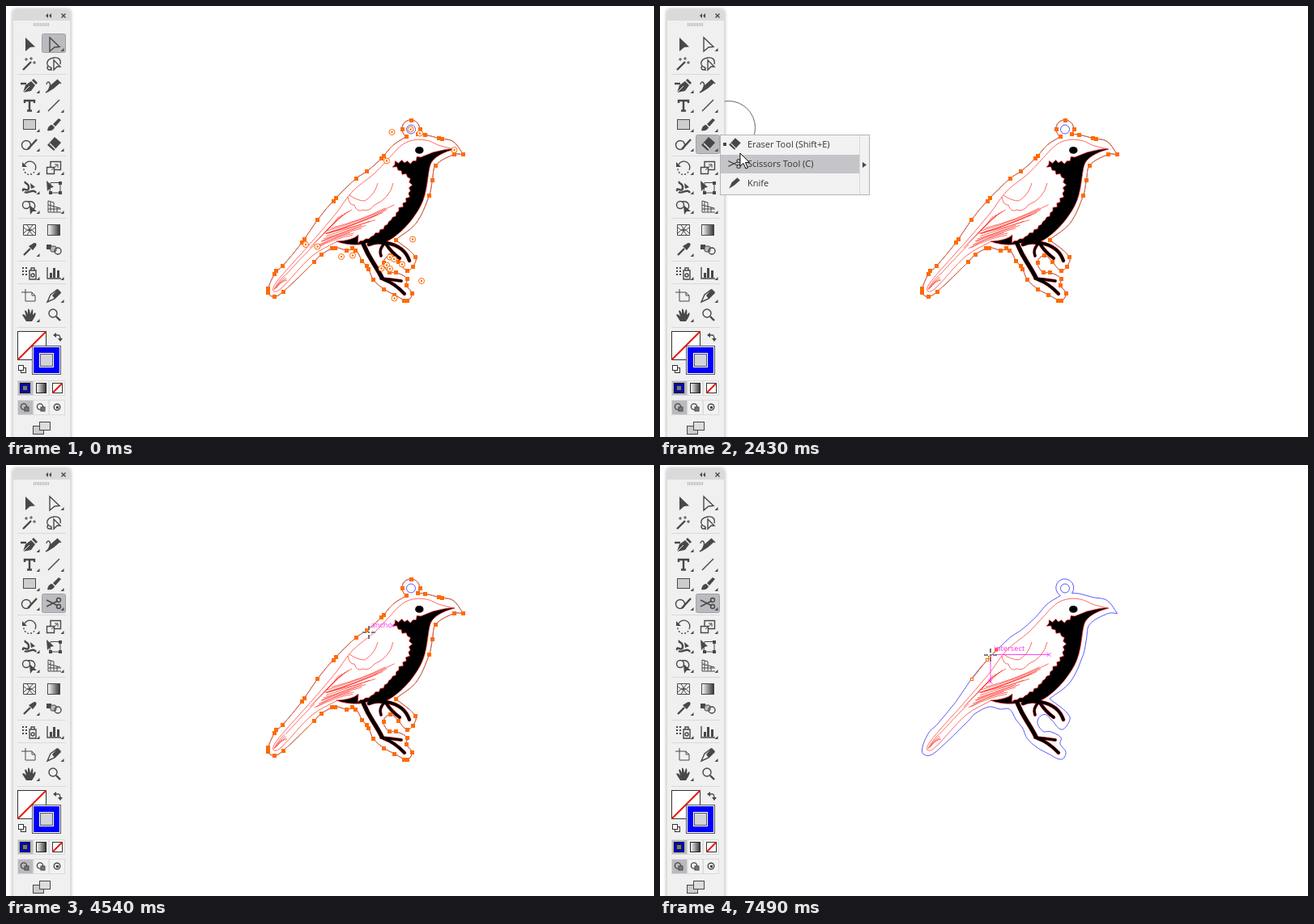
Animation of 800 by 533 pixels, one loop 8 s. Source, as an HTML page:

```html
<!DOCTYPE html>
<html lang="en">
<head>
<meta charset="utf-8">
<title>Scissors tool</title>
<style>
html, body { margin: 0; width: 100%; height: 100%; overflow: hidden; background: #fff; }
svg { display: block; width: 800px; height: 533px; }
.s { fill: none; stroke: #484848; stroke-width: 1.4; }
.thin { stroke-width: 1; }
.bold { stroke-width: 2.4; }
.f { fill: #484848; }
.sep { stroke: #d9d9d9; }
.hair { fill: none; stroke: #ff3a30; stroke-width: .75; }
.ink { fill: #000; stroke: #f22; stroke-width: .7; }
.limb { fill: none; stroke-linecap: round; }
.cut { fill: none; stroke: #3030f4; stroke-width: .8; }
.sel { fill: none; stroke: #ff6a00; stroke-width: .9; }
.node { fill: #ff6a00; }
.open { fill: #fff; stroke: #ff6a00; }
.hot .edge { stroke: #ff6a00; }
.guide { fill: none; stroke: #ff2df5; stroke-width: .9; }
.tag { font: 9.3px "Open Sans", "Noto Sans", sans-serif; fill: #ff2df5; }
.menu { font: 11px "Open Sans", "Noto Sans", sans-serif; fill: #333; }
</style>
</head>
<body>
<svg id="stage" viewBox="0 0 800 533" xmlns="http://www.w3.org/2000/svg"></svg>
<script>
const stroke = (d, cls = '') => `<path class="s ${cls}" d="${d}"/>`;
const fill = d => `<path class="f" d="${d}"/>`;
const at = (x, y, art) => `<g transform="translate(${x} ${y})">${art}</g>`;
const rect = (x, y, w, h, paint, line = 'none', extra = '') =>
  `<rect x="${x}" y="${y}" width="${w}" height="${h}" fill="${paint}" stroke="${line}" ${extra}/>`;
const ring = (x, y, r, cls = 's') => `<circle cx="${x}" cy="${y}" r="${r}" class="${cls}"/>`;
const range = n => [...Array(n).keys()];
const mix = (a, b, k) => a + (b - a) * k;

let seed = 7;
const rnd = () => (seed = seed * 16807 % 2147483647) / 2147483647;

// Smooth line through "x,y" points. "/" makes the point before it a corner,
// "*" marks a point without an anchor, "=" adds a second anchor just after.
function spline(text) {
  const nodes = [];
  let d = '', last;
  for (const run of text.trim().split('/')) {
    const p = run.trim().split(/\s+/).map(w => ({ at: w.split(',').map(parseFloat), flag: w.slice(-1) }));
    if (last) p.unshift(last);
    const dir = i => {
      const a = p[Math.max(i - 1, 0)].at, b = p[Math.min(i + 1, p.length - 1)].at;
      const n = Math.hypot(b[0] - a[0], b[1] - a[1]);
      return [(b[0] - a[0]) / n, (b[1] - a[1]) / n];
    };
    if (!last) d = 'M' + p[0].at;
    p.forEach(({ at: [x, y], flag }, i) => {
      const u = dir(i);
      if (flag !== '*') nodes.push([x, y]);
      if (flag === '=') nodes.push([x + u[0] * 4.5, y + u[1] * 4.5]);
      if (i + 1 === p.length) return;
      const [x2, y2] = p[i + 1].at, v = dir(i + 1), k = Math.hypot(x2 - x, y2 - y) / 3;
      d += `C${[x + u[0] * k, y + u[1] * k, x2 - v[0] * k, y2 - v[1] * k, x2, y2].map(n => n.toFixed(1))}`;
    });
    last = p[p.length - 1];
  }
  return { d, nodes };
}

// Ragged feather edge along a path, calmer towards its end
function ragged(d, step, size) {
  const path = document.createElementNS('http://www.w3.org/2000/svg', 'path');
  path.setAttribute('d', d);
  const length = path.getTotalLength(), n = Math.round(length / step);
  return range(n + 1).map(i => {
    const s = i * length / n;
    const a = path.getPointAtLength(s - 1), b = path.getPointAtLength(s + 1), p = path.getPointAtLength(s);
    const off = (i % 2 ? 1 : -1) * size * rnd() * (1 - .6 * i / n);
    const w = Math.hypot(b.x - a.x, b.y - a.y) || 1;
    return `L${(p.x - (b.y - a.y) / w * off).toFixed(1)},${(p.y + (b.x - a.x) / w * off).toFixed(1)}`;
  }).join('');
}

/* ---------- bird ---------- */
const outline = spline(`508.5,158.5 517,159 534,163.5= 552,167.5* 564.5,183.5 /
  553.5,183.5 530.5,197 526.5,215 522.5,234.5 506,269* 481,289 /
  505.5,310.5 502.5,322 495,327 484,316 474.5,308.5 466,317 473,329.5 481,329.5 495,337 494,345
  501,355.5 495.5,364= 479.5,357 466.5,350 453.5,338.5 447.5,325= 439.5,315 431.5,302= 420,302
  406.5,299= 389,307.5 380.5,316.5 342.5,353 331,359.5 323.5,354= 331.5,331.5= 341.5,321.5
  365.5,292.5= 384.5,264.5 404,241= 432.5,213 445.5,204.5 463.5,188.5= 478,172* 494.5,161.5`);
const whole = outline.d + 'A11,11 0 1 1 508.5,158.5';
const anchors = [...outline.nodes, ...[2, 3, 4].map(q =>
  [500 + 11 * Math.cos(q * Math.PI / 2), 152.5 + 11 * Math.sin(q * Math.PI / 2)])];

const body = spline(`553,177 535,172.5 521,166.5 505,165.5 490,171 472,189 455,207 428,229 407,257
  372,298 345,328 331,346 331,353 340,349 378,309 409,291`).d;

const chest = spline('512,187 500,193 482,192 / 478,197 488,205 498,215 498,232 486,251 470,270 452,285 434,292').d;
const bib = 'M554,177C545,176 537,179 527,181' + ragged(chest, 3.6, 3.2) +
  'L435,283Q428,290 408,291Q420,296 437,295C447,291 455,295 466,293' +
  'C480,288 500,270 512,247C521,230 520,208 524,196C527,188 538,181 554,177Z';

const limbs = [
  [5, 'M441,294Q446,306 453,317T464,336'], [3.2, 'M463,337Q474,338 488,340'],
  [3.6, 'M466,338Q480,343 492,356'], [4, 'M448,295Q458,290 470,294'],
  [3, 'M467,294Q460,301 463,309'], [3.6, 'M469,294Q476,305 486,312'], [3.8, 'M470,293Q492,297 498,315']
];
const limb = grow => limbs.map(([w, d]) =>
  `<path class="limb" d="${d}" stroke="${grow ? '#f22' : '#000'}" stroke-width="${w + grow}"/>`).join('');

// Flight feathers fan out from the wing tip, tail barbs run along the tail
const flight = range(13).map(i => {
  const k = i / 12, r = rnd() * 14;
  const x = mix(394, 378, k) + r, y = mix(279, 303, k) - r * .7;
  const x2 = mix(484, 430, k) - rnd() * 12, y2 = mix(244, 283, k) + rnd() * 5;
  return `M${x},${y}Q${mix(x, x2, .55)},${mix(y, y2, .55) - mix(-5, 4, k)} ${x2},${y2}`;
}).join('');
const coverts = range(5).map(i => `M${427 - i * 4},${252 + i * 2}Q${413 - i * 3},${258 + i * 4} ${391 - i * 4},${283 + i * 4}`).join('');
const barbs = range(4).map(i => `M${331 + i},${351 - i}Q${334 + i * 2},${343 - i} ${344 + i},${333 + i * 2}`).join('');
const scallops = 'M422,236Q424,247 430,246Q433,256 441,252Q448,255 455,246Q474,238 478,219' +
  'M424,234Q434,241 443,241Q455,234 459,219M381,295Q361,315 345,333';

const square = ([x, y]) => rect(Math.round(x - 2.5), Math.round(y - 2.5), 5, 5, '#ff6a00');
const hollow = ([x, y]) => rect(x - 1.5, y - 1.5, 3, 3, '#fff', '#ff6a00');
const dot = ([x, y]) => ring(x, y, 2.4, 'node');
const target = ([x, y]) => ring(x, y, 3.5, 'open') + ring(x, y, 1.2, 'node');
const each = (text, draw) => spline(text).nodes.map(draw).join('');

const widgets = `476.5,156 499.5,152.5 511,157.5 470,191.5 553.5,178 502,288.5 370,295 384.5,297.5 414,310
  428,308.5 474,310.5 479,313 489,319.5 470,320.5 463.5,324.5 474,325 513,340 479.5,361.5`;
const ends = '407,238 404,241 385,265';
const longCut = `<path class="sel" d="${spline('453.5,199.5 445.5,204.5 433,213 ' + ends).d}"/>` +
  each('453.5,199.5 446,204.5 441.5,207.5 437.5,209.5', dot) + each('433,213 ' + ends, hollow);
const shortCut = `<path class="sel" d="${spline('415,228.5 ' + ends).d}"/>` + dot([415.5, 228.5]) + each(ends, hollow);

const bird = `<path class="cut" d="${whole}"/>${ring(500, 152.5, 5.5, 'cut')}
  <g id="inner"><path class="hair edge" d="${body}"/><path class="hair" d="${flight}${coverts}${barbs}${scallops}"/>
  ${limb(.8)}<path class="ink edge" d="${bib}"/>${limb(0)}</g>
  <ellipse cx="510.3" cy="178.4" rx="5.2" ry="4.4"/>`;

/* ---------- panel ---------- */
const nib = fill('M-8,8L-5,-1L2,-6L7,-1L2,6Z') + fill('M3,-7L5,-9L10,-4L8,-2Z') +
  '<path d="M-8,8L0,0" stroke="#f0f0f0"/>';
const eraser = fill('M-8,1L1,-9L9,-2L0,8Z') + '<path d="M-5,-1L2,6" stroke="#eee" stroke-width="1.4"/>';
const scissors = stroke('M5,-3L-9,4M5,3L-9,-4') + ring(6, -4, 2.5) + ring(6, 4, 2.5);
const knife = fill('M-8,8L-4,-1L4,-8L8,-4L0,3Z');
const arrow = 'M-5,-8L7,3.5L1,4L-5,9Z';
const spark = (x, y) => stroke(`M${x - 2},${y}h4M${x},${y - 2}v4`, 'thin');

// Two icons per row, from top to bottom
const icons = [
  fill(arrow), stroke(arrow),
  stroke('M-8,8L2,-2', 'bold') + spark(-4, -5) + spark(2, -6) + spark(6, -1),
  stroke('M-3,5C-10,4 -11,-5 0,-7C7,-8 9,-4 8,1M-6,3a2.5,2.5 0 1 0 3,2v4') + stroke('M0,-4L8,4L4,4L0,8Z'),
  nib + stroke('M-11,-3h7', 'bold'),
  knife + stroke('M4,-8L9,-3M-9,-2C-8,-8 -3,-4 -5,1C-6,5 -8,7 -10,8'),
  stroke('M-6,-3V-6H6V-3M0,-6V6.500M-3,6.5H3', 'bold'), stroke('M-7,7L7,-7'),
  rect(-7.5, -6.5, 15, 12, '#cdcdcd', '#484848'),
  fill('M-8,7C-7,2 -5,0 -2,0L1,3C0,6 -3,8 -8,7ZM-1,-1L6,-8L9,-6L2,2Z'),
  ring(-4, 1, 5.5) + stroke('M-2,6L9,-6', 'bold'), '',
  stroke('M-6,-4A7,7 0 0 1 7,3') + '<path class="s" d="M6,5A7,7 0 0 1 -7,1" stroke-dasharray="2 2"/>' + fill('M-9,-7v6h6Z'),
  stroke('M-8.5,-.5h9v8h-9ZM-4,-1V-7.5H8.5V2.500H1') + stroke('M-3,3L5,-4M1,-4H5V0', 'thin'),
  stroke('M-8,5C-9,-2 -2,8 -1,1C0,-5 -7,-4 -5,-7M-6,6C-2,9 5,1 8,7', 'bold') + fill('M1,-5L7,0L2,2Z'),
  stroke('M-4,-5.5H8V7H-5Z', 'thin') + fill('M-9,-8L0,0L-4,1L-8,5ZM6,-7h4v4h-4ZM6,5h4v4h-4ZM-6,5h4v4h-4Z'),
  ring(-4, -2, 4.5) + stroke('M-2,-6C8,-8 9,3 3,4') + fill('M0,-2L9,6L4,6L1,10Z'),
  stroke('M-7,-7V7H9M-7,-7L0,-5V7M-7,-2L8,2M-7,3H9M-4,-6V6M4,1V7', 'thin'),
  stroke('M-7.5,-6.5H7.5V6.5H-7.5ZM-7,-3Q0,4 7,-3M-7,4Q0,-5 7,4M-3,-6Q3,0 -3,6M4,-6Q-3,0 4,6', 'thin'),
  rect(-7.5, -6.5, 15, 13, 'url(#ramp)', '#484848'),
  stroke('M-7,7L1,-1', 'bold') + fill('M-1,-4L4,1L8,-4C10,-8 6,-9 4,-7Z'),
  rect(-9, -6, 6, 6, '#484848') + rect(-4, -4, 7, 7, '#bbb', '#484848', 'rx="2"') + ring(5, 2, 4),
  stroke('M0,-3H8V8H0ZM2,-3V-6H6V-3') + ring(4, 3, 2) +
    range(6).map(i => rect(-9 + i % 2 * 4, -7 + (i >> 1) * 4, 2, 2, '#484848')).join(''),
  stroke('M-8,-7V7H9') + fill('M-5,0h3v6h-3ZM-1,-6h3v12h-3ZM4,-3h3v9h-3Z'),
  stroke('M-10,-4H3L7,0V7H-5V-8M3,-4V0H7', 'thin'),
  stroke('M-8,8L-4,-1L4,-7L8,-3L1,4Z') + fill('M-2,0L5,-8L9,-4L1,4Z'),
  fill('M-4,8L-9,0Q-7,-2 -4,2L-6,-5Q-4,-7 -2,-1V-7Q0,-9 1,-1L3,-7Q5,-7 4,0L7,-3Q9,-2 5,5L3,8Z'),
  ring(-1, -2, 5) + stroke('M3,2L8,7', 'bold')
];
const hasMore = '0100101111111110110010110110';
const groups = [[47, 2], [99, 4], [200, 3], [277, 2], [330, 1], [358, 2]];
const rows = groups.flatMap(([y, n]) => range(n).map(k => y + 24 * k));
const tool = (art, i) => at(29 + i % 2 * 30, rows[i >> 1], art + (+hasMore[i] ? fill('M12.5,5v4h-4Z') : ''));

const none = (x, y, s) => rect(x, y, s, s, '#fff', '#333') + `<path d="M${x},${y + s}L${x + s},${y}" stroke="#e21b0c" stroke-width="2"/>`;
const trio = y => range(3).map(i => rect(14.5 + i * 19.5, y, 19, 18, i ? '#f2f2f2' : '#b9b9be', '#dadada')).join('');
const mode = x => ring(x - 1, 495.5, 3.6) + rect(x, 496, 5, 5, '#777', '#484848');

const panel = `<g style="filter:drop-shadow(0 0 2px #999)"><rect x="8.5" y="4.5" width="71" height="540" rx="3" fill="#f0f0f0"/></g>
  <path d="M9,17V8Q9,5 12,5H76Q79,5 79,8V17Z" fill="#dadada"/><path class="sep" d="M9,17.5H79"/>
  ${fill('M52,9v6l-3,-3ZM56,9v6l-3,-3Z')}${stroke('M68.500,9.500l5,5m0,-5l-5,5')}
  <path d="M34,23H54" stroke="#b5b5b5" stroke-width="4" stroke-dasharray="1 1"/>
  ${groups.slice(1).map(([y]) => `<path class="sep" d="M14,${y - 14.5}H74"/>`).join('')}<path class="sep" d="M14,397.5H74"/>
  <rect id="pick" x="44.5" width="29" height="23" rx="2" fill="#bababf" stroke="#a2a2a6"/>
  ${icons.map(tool).join('')}
  <g id="eraser">${at(59, 171, eraser)}</g><g id="scissors">${at(59, 171, scissors)}</g>
  ${none(14.5, 402.5, 35)}
  ${rect(32.5, 420.5, 35, 35, '#fff', '#555')}${rect(34, 422, 32, 32, '#00f')}
  ${rect(41.5, 429.5, 17, 17, '#d3d3da', '#fff')}${rect(42.5, 430.5, 15, 15, 'none', '#555')}
  ${stroke('M60,407H65Q67,407 67,413')}${fill('M58,407l4,-3v6ZM67,415l-3,-4h6Z')}
  ${rect(18.5, 447.5, 6, 6, '#fff', '#333')}${rect(15.5, 444.5, 6, 6, '#fff', '#333')}
  ${trio(463.5)}${rect(17.5, 466.5, 12, 12, '#00f', '#111')}${rect(20.5, 469.5, 6, 6, '#777', '#222')}
  ${rect(37.5, 466.5, 12, 12, 'url(#ramp)', '#222')}${none(57.5, 466.5, 12)}
  ${trio(487.5)}${mode(23)}${mode(43)}${ring(63, 496, 3.8)}${rect(62, 495, 3, 3, '#484848')}
  ${rect(33.5, 519.5, 13, 10, '#ccc', '#484848')}${rect(41.5, 514.5, 13, 10, '#ddd', '#484848')}`;

const choice = (art, text, i) => at(92, 171 + i * 24, `<g transform="scale(.85)">${art}</g>`) +
  `<text class="menu" x="108" y="${175 + i * 24}">${text}</text>`;
const flyout = rect(74.5, 159.5, 184, 74, '#f2f2f2', '#b4b4b4') +
  rect(75, 160, 171, 23, '#c4c4c9', 'none', 'id="hover"') + '<path class="sep" d="M246.5,160V233"/>' +
  fill('M250,193v7l5,-3.5ZM78,169h4v4h-4Z') + choice(eraser, 'Eraser Tool  (Shift+E)', 0) +
  choice(scissors, 'Scissors Tool  (C)', 1) + choice(knife, 'Knife', 2);

const cross = 'M-8,0H-3M3,0H8M0,-8V-3M0,3V8M-1,0H1';
document.getElementById('stage').innerHTML = `
  <defs><linearGradient id="ramp"><stop stop-color="#fff"/><stop offset="1" stop-color="#333"/></linearGradient></defs>
  ${bird}
  <g id="full"><path class="sel" d="${whole}"/>${anchors.map(square).join('')}</g>
  <g id="widgets">${each(widgets, target)}</g>
  <g id="longCut">${longCut}</g><g id="shortCut">${shortCut}</g>
  <circle id="brush" cx="84.5" cy="150.5" r="33" fill="none" stroke="#555" stroke-width=".9"/>
  ${panel}
  <g id="flyout">${flyout}</g>
  <path id="align" d="M111,183.5H515" stroke="#8c8c8c"/>
  <path id="guide" class="guide"/><text id="tag" class="tag"/>
  <g id="cross"><path d="${cross}" stroke="#fff" stroke-width="2.6"/><path d="${cross}" stroke="#000" stroke-width="1.1"/></g>
  <path id="mouse" d="M0,0V16L4,12.5L7,19L9.5,18L6.5,11.5H11.5Z" fill="#fff" stroke="#000"/>`;

/* ---------- timeline ---------- */
const $ = Object.fromEntries([...document.querySelectorAll('[id]')].map(e => [e.id, e]));
const show = (id, on) => { $[id].style.display = on ? '' : 'none'; };
const put = (id, [x, y]) => $[id].setAttribute('transform', `translate(${x.toFixed(1)} ${y.toFixed(1)})`);
const ease = k => k * k * (3 - 2 * k);
const mark = (x, y) => `M${x - 2.5},${y - 2.5}l5,5m0,-5l-5,5`;
const ray = (x, y, x2, y2) => `M${x},${y}L${x2},${y2}` + mark(x2, y2);

// Stops are [time, x, y]; the pointer moves between them in 77 ms ticks
const mousePath = [[540, 668, 530], [1330, 89, 189], [1410, 72, 178], [1490, 60, 169], [2190, 60, 169], [2510, 108, 185]];
const crossPath = [[2890, 111, 187], [3660, 450, 204], [4540, 448, 207], [5620, 448, 209], [5930, 419, 229], [6090, 408, 235]];
function along(stops, t) {
  const i = stops.findIndex(s => s[0] > t);
  if (i < 1) return stops[i < 0 ? stops.length - 1 : 0].slice(1);
  const [t0, x0, y0] = stops[i - 1], [t1, x1, y1] = stops[i];
  const k = ease(Math.min(1, Math.floor((t - t0) / 77 + .01) * 77 / (t1 - t0)));
  return [mix(x0, x1, k), mix(y0, y1, k)];
}

function draw(t) {
  const during = (a, b) => t >= a && t < b;
  const cutting = t >= 2890, erasing = t >= 1720;
  show('widgets', !erasing);
  show('full', t < 5000);
  show('longCut', during(5000, 7410));
  show('shortCut', t >= 7410);
  show('brush', during(1810, 2890));
  show('flyout', during(2040, 2890));
  $.hover.setAttribute('y', t < 2430 ? 160 : 184);
  show('eraser', !cutting);
  show('scissors', cutting);
  $.pick.setAttribute('y', erasing ? 159.5 : 34.5);
  $.inner.setAttribute('class', during(3500, 3580) || during(5780, 5930) ? 'hot' : '');
  show('mouse', during(540, 2750));
  put('mouse', along(mousePath, t));
  show('cross', cutting);
  put('cross', along(crossPath, t));
  show('align', during(2890, 2967));

  // Smart guides hang on the point of the path that the pointer snaps to
  const [x, y] = t < 5500 ? [446, 205] : t < 6010 ? [420.5, 224.5] : [408, 234.5];
  const named = during(3660, 4930) || during(5930, 6010) || t >= 6320;
  $.tag.textContent = named ? during(4540, 4930) ? 'anchor' : 'intersect' : '';
  $.tag.setAttribute('x', x + 4.5);
  $.tag.setAttribute('y', y - 4.5);
  let d = '';
  if (during(2890, 2967)) d = mark(515, 183.5);
  if (during(3660, 4540)) d = ray(x, y, 449.5, t < 3840 ? 247.5 : t < 4080 ? 280 : 264);
  if (during(5490, 5550)) d = ray(448, 209, 448, 281);
  if (during(5930, 6010)) d = `M${x},${y}L422,247` + mark(421, 233);
  if (t >= 6320) d = ray(x, y, 480, y);
  if (t >= 6870) d += ray(x, y, x, 268);
  $.guide.setAttribute('d', d);
}

const start = performance.now();
function tick() {
  draw((performance.now() - start) % 8000);
  requestAnimationFrame(tick);
}
tick();
</script>
</body>
</html>
```
